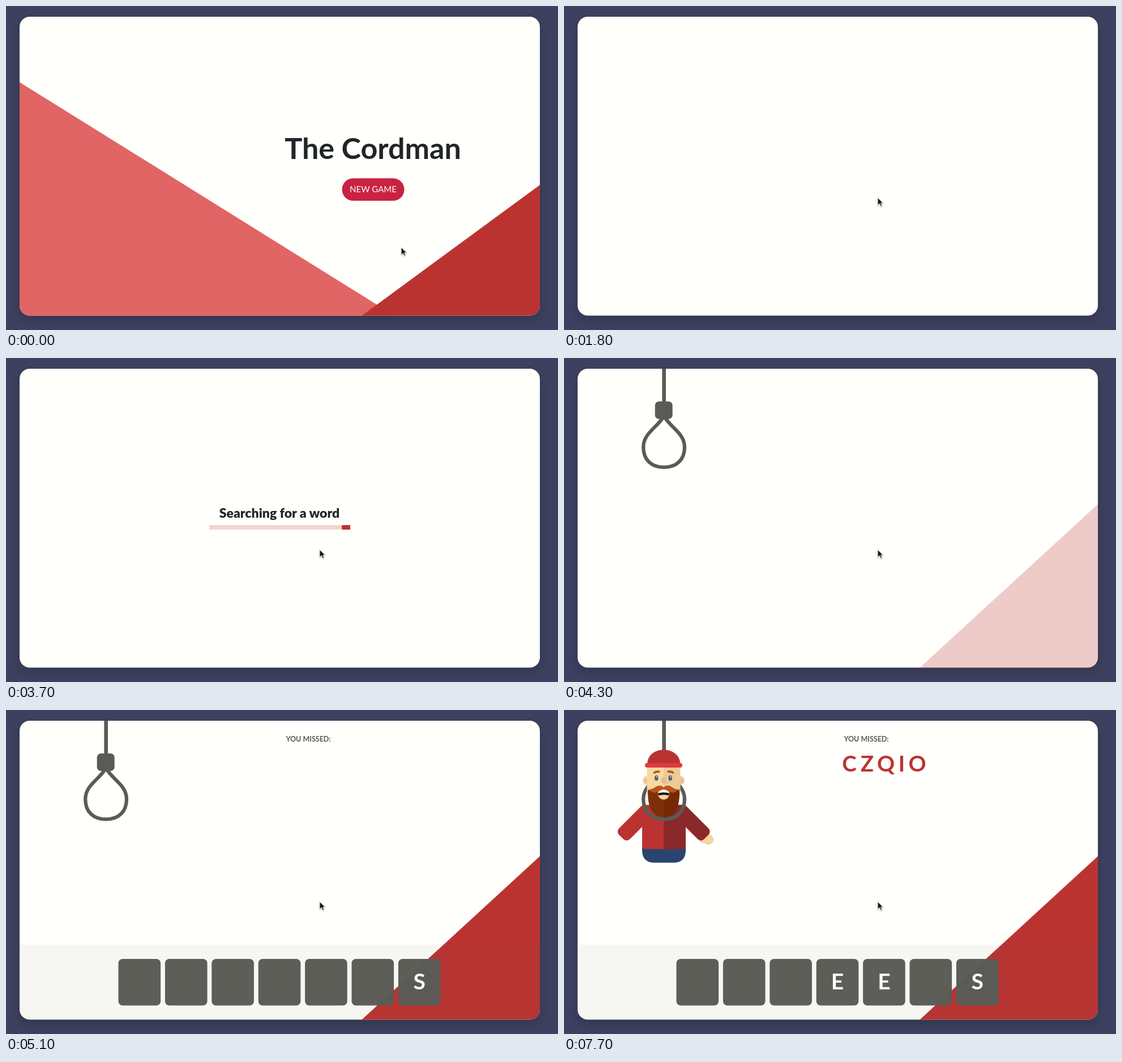
Write an HTML page that moves like this. It is 975x574 px and loops after 8000 ms.

```html
<!DOCTYPE html>
<html lang="en">
<head>
<meta charset="utf-8">
<title>Word game</title>
<style>
  html, body { margin: 0; width: 100%; height: 100%; overflow: hidden; background: #3d405e; }
  svg { display: block; width: 975px; height: 574px; }
  text { font-family: Lato, "Open Sans", sans-serif; font-weight: 700; text-anchor: middle; }
  .card { filter: drop-shadow(0 8px 8px rgba(0, 0, 0, .15)); }
</style>
</head>
<body>
<svg viewBox="0 0 975 574">
  <defs>
    <clipPath id="cardClip"><rect x="24" y="19" width="919" height="529.5" rx="18"/></clipPath>
    <clipPath id="trackClip"><rect x="359" y="296" width="249" height="8"/></clipPath>
    <clipPath id="rightHalf"><rect x="176" y="60" width="60" height="200"/></clipPath>
  </defs>
  <rect width="975" height="574" fill="#3d405e"/>
  <rect class="card" x="24" y="19" width="919" height="529.5" rx="18" fill="#fffffc"/>

  <g clip-path="url(#cardClip)">
    <g id="home">
      <path id="leftWedge" fill="#e06564"/>
      <path id="rightWedge" fill="#bb3331"/>
      <g id="menu">
        <text x="648" y="271" font-size="52" fill="#212529">The Cordman</text>
        <rect id="button" x="593.5" y="305.3" width="110" height="39.7" rx="19.8" fill="#c92242"/>
        <text x="648.5" y="330" font-size="15" fill="#fff" style="font-weight:400">NEW GAME</text>
      </g>
    </g>

    <g id="loader">
      <text x="483" y="283" font-size="23" fill="#212529" style="font-weight:900">Searching for a word</text>
      <rect x="359" y="296" width="249" height="8" fill="#f1d5d0"/>
      <g clip-path="url(#trackClip)">
        <rect id="chunk" y="296" width="100" height="8" rx="2.5" fill="#bb3331"/>
      </g>
    </g>

    <g id="game">
      <path id="gameWedge" d="M943 259V549H628Z" fill="#bb3331"/>
      <g id="panel">
        <rect x="24" y="416" width="919" height="133" fill="#5a5b55" fill-opacity=".055"/>
        <g id="tiles"></g>
        <text x="534" y="56" font-size="12.5" fill="#5a5b55">YOU MISSED:</text>
      </g>
      <g id="missed" fill="#bb3331"></g>

      <g id="handR" fill="#f3d5a0">
        <circle cx="254.8" cy="229.5" r="9.3"/>
        <ellipse cx="246" cy="231" rx="7" ry="4.5"/>
      </g>
      <rect id="armL" x="35" y="-13.5" width="71" height="27" rx="8" fill="#bb3331" transform="translate(176 150) rotate(135)"/>
      <rect id="armR" x="35" y="-13.5" width="71" height="27" rx="8" fill="#8a292c" transform="translate(176.5 150) rotate(45)"/>
      <g id="torso">
        <path d="M138 236H215V248Q215 270.5 193 270.5H160Q138 270.5 138 248Z" fill="#29456f"/>
        <path d="M138 168H176V246.500H144Q138 246.500 138 240Z" fill="#bb3331"/>
        <path d="M176 168H215V240Q215 246.500 209 246.500H176Z" fill="#8a292c"/>
      </g>

      <g id="noose" fill="#5a5b55">
        <path d="M173.300 0H180V80H173.300Z"/>
        <rect x="160.700" y="77" width="31" height="31" rx="7"/>
        <path d="M174.500 106C163 124 140.200 134 140.200 158C140.200 180 154 193.700 176.500 193.700S213 180 213 158C213 134 190 124 178.500 106" fill="none" stroke="#5a5b55" stroke-width="6.300"/>
      </g>

      <g id="head">
        <g fill="#f3d5a0">
          <circle cx="147" cy="125" r="8"/>
          <circle cx="205" cy="125" r="8" fill="#ebcc98"/>
        </g>
        <g fill="#e8bd9c">
          <circle cx="146" cy="125" r="4.300"/>
          <circle cx="206" cy="125" r="4.300"/>
        </g>
        <path d="M146.500 98H176V160H156Q146.500 156 146.500 145Z" fill="#f6d9a3"/>
        <path d="M176 98H205.500V145Q205.500 156 196 160H176Z" fill="#ebcc98"/>
        <path d="M147 97C147 80 160 70.500 176 70.500S205.500 80 205.500 97Z" fill="#bb3331"/>
        <rect x="143" y="94" width="66" height="8" rx="4" fill="#df3b40"/>
        <g fill="none" stroke="#bb5319" stroke-width="3.600" stroke-linecap="round">
          <path d="M159.500 111Q163 108.500 168 109.300"/>
          <path d="M192.500 111Q189 108.500 184 109.300"/>
        </g>
        <g fill="#56636b">
          <ellipse cx="163.300" cy="120.500" rx="3.300" ry="4.800"/>
          <ellipse cx="187.700" cy="120.500" rx="3.300" ry="4.800"/>
        </g>
        <g fill="#fff">
          <circle cx="164" cy="118.500" r="1"/>
          <circle cx="188.400" cy="118.500" r="1"/>
        </g>
        <rect x="172" y="118.500" width="8" height="12" rx="4" fill="#e5b899"/>
        <path id="beard" d="M148.500 140C152 146 158 139 176 139S200 146 203.500 140C205 160 202 190 176 190S147 160 148.500 140Z" fill="#7d3008"/>
        <path d="M148.500 140C152 146 158 139 176 139S200 146 203.500 140C205 160 202 190 176 190S147 160 148.500 140Z" fill="#732904" clip-path="url(#rightHalf)"/>
        <circle cx="176" cy="148.500" r="10.300" fill="#f3d5a0"/>
        <path d="M166.500 146.500Q176 136 185.500 146.500Z" fill="#fff"/>
        <path d="M166 147.500Q176 144.500 186 147.500L185 151.500Q176 149 167 151.500Z" fill="#141210"/>
        <path d="M151 139.500C157 143 160 134 169 134Q174 134 176 137.500Q178 134 183 134C192 134 195 143 201 139.500C198 149 189 147 184 143.500Q176 138 168 143.500C163 147 154 149 151 139.500Z" fill="#bb5319"/>
      </g>
    </g>
  </g>

  <path id="cursor" d="M0 0V13.600L3.300 10.700L5.500 15.300L7.800 14.200L5.700 9.800H9.800Z" fill="#181818" stroke="#fff" stroke-width="1" style="filter:drop-shadow(0 1px 1px rgba(0,0,0,.35))"/>
</svg>

<script>
const LOOP = 8000, STEP = 100;
const NS = "http://www.w3.org/2000/svg";
const el = {};
document.querySelectorAll("svg [id]").forEach(n => el[n.id] = n);

function add(parent, tag, attrs, label) {
  const n = document.createElementNS(NS, tag);
  for (const k in attrs) n.setAttribute(k, attrs[k]);
  if (label) n.textContent = label;
  return parent.appendChild(n);
}

const clamp = x => Math.min(1, Math.max(0, x));
const prog = (t, from, to) => clamp((t - from) / (to - from));
const mix = (a, b, p) => a + (b - a) * p;
const inOut = p => p < .5 ? 2 * p * p : 1 - 2 * (1 - p) ** 2;
const outCubic = p => 1 - (1 - p) ** 3;
const outBack = p => 1 + 1.9 * (p - 1) ** 3 + .9 * (p - 1) ** 2;
const show = (n, on) => n.style.display = on ? "" : "none";
const move = (n, x, y) => n.setAttribute("transform", `translate(${x} ${y})`);

// Word tiles: letter and the time it is revealed
const word = [..."   EE S"].map((c, i) => {
  const x = 198.5 + 82.4 * i;
  add(el.tiles, "rect", { x, y: 441, width: 74.6, height: 82.5, rx: 7.5, fill: "#5a5b55", "fill-opacity": .98 });
  const node = add(el.tiles, "text", { x: x + 37.3, y: 495, "font-size": 39, fill: "#fff" }, c.trim());
  return { node, at: c === "E" ? 6300 : 0 };
});

const misses = [["C", 504, 5800], ["Z", 535.5, 5800], ["Q", 568.5, 6700], ["I", 596.5, 7500], ["O", 624, 7700]]
  .map(([c, x, at]) => ({ node: add(el.missed, "text", { x, y: 109, "font-size": 38.5 }, c), at }));

const parts = [["head", 5800], ["torso", 5800], ["armR", 6700], ["handR", 7500], ["armL", 7700]]
  .map(([id, at]) => ({ node: el[id], at }));

const timed = [...word, ...misses, ...parts];

function drawHome(t) {
  show(el.home, t < 1800);
  const left = 663 * (1 - inOut(prog(t, 600, 1000)));
  const right = 315 * (1 - inOut(prog(t, 800, 1380)));
  el.leftWedge.setAttribute("d", `M24 135V549H${24 + left}Z`);
  el.rightWedge.setAttribute("d", `M943 317V549H${943 - right}Z`);
  el.button.setAttribute("opacity", mix(1, .65, prog(t, 250, 450)));
  el.menu.setAttribute("opacity", 1 - prog(t, 1350, 1750));
}

function drawLoader(t) {
  show(el.loader, t >= 2100 && t < 4200);
  const enter = outBack(prog(t, 2000, 2800));
  const leave = prog(t, 3800, 4200) ** 2;
  move(el.loader, mix(-600, 0, enter) - 640 * leave, 0);
  const u = ((t + 257) % 1000) / 1000;
  el.chunk.setAttribute("x", mix(259, 608, u));
}

function drawGame(t) {
  show(el.game, t >= 3900);
  move(el.noose, 0, mix(-200, 0, outCubic(prog(t, 3900, 4300))));
  el.gameWedge.setAttribute("opacity", prog(t, 4175, 4675));
  el.panel.setAttribute("opacity", prog(t, 4700, 5100));
  timed.forEach(({ node, at }) => show(node, t >= at));
}

function drawCursor(t) {
  const a = inOut(prog(t, 0, 500)), b = inOut(prog(t, 1000, 1500));
  move(el.cursor, mix(mix(698, 664, a), 554, b), mix(mix(427.5, 328, a), 339.5, b));
}

function draw(ms) {
  const t = Math.floor((ms % LOOP) / STEP) * STEP;
  drawHome(t);
  drawLoader(t);
  drawGame(t);
  drawCursor(t);
}

const start = performance.now();
function tick() {
  draw(performance.now() - start);
  requestAnimationFrame(tick);
}
tick();
</script>
</body>
</html>
```
